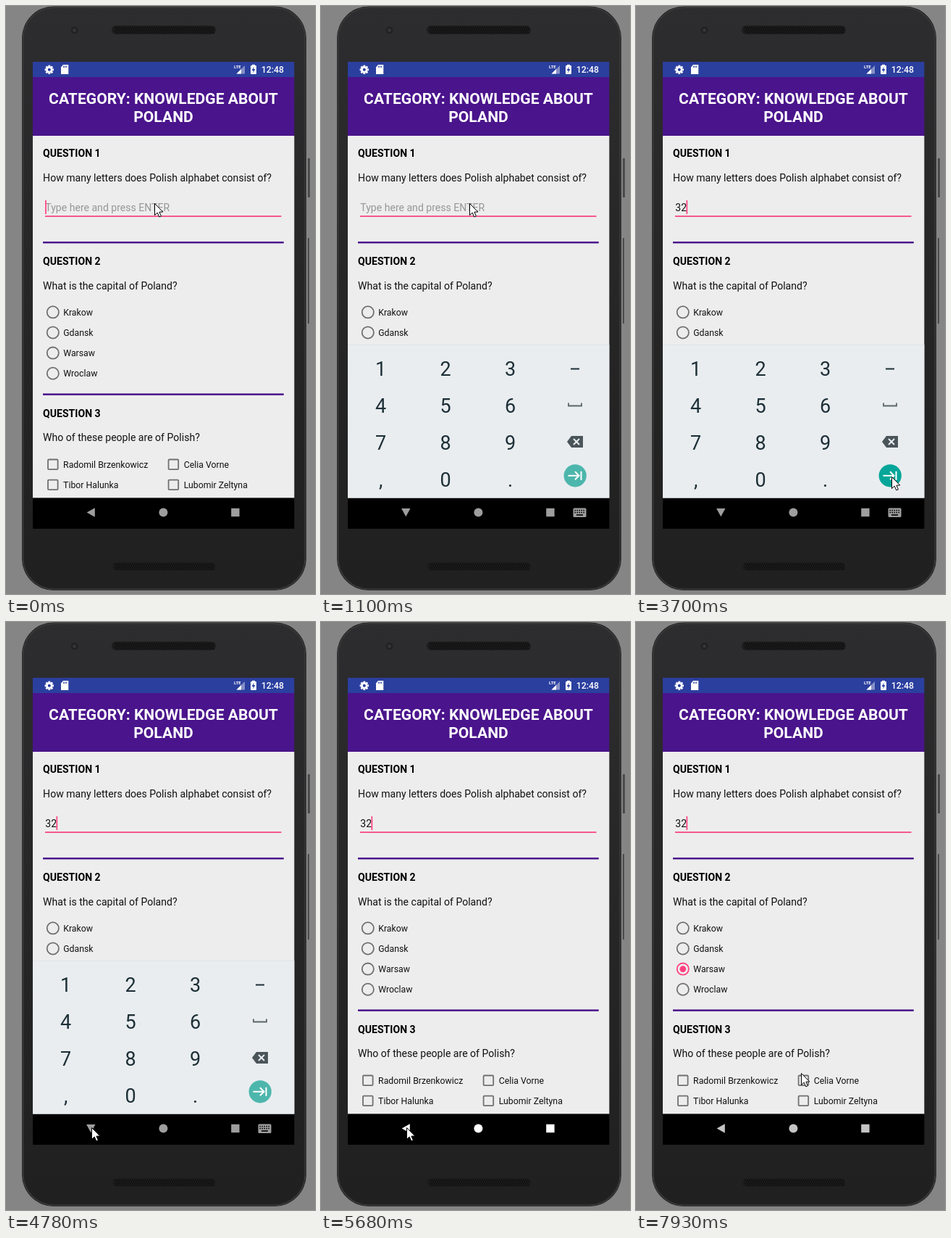
These frames come from a looping animation (427x811 px, 8 s). An HTML page with a canvas:

```html
<!DOCTYPE html>
<html lang="en">
<head>
<meta charset="utf-8">
<title>Quiz on a phone</title>
<style>
html, body { margin: 0; width: 100%; height: 100%; overflow: hidden; background: #858585; }
canvas { display: block; width: 427px; height: 811px; }
</style>
</head>
<body>
<canvas id="stage" width="427" height="811"></canvas>
<script>
const stage = document.getElementById('stage');
const main = stage.getContext('2d');
const layer = document.createElement('canvas');
layer.width = stage.width;
layer.height = stage.height;
const overlay = layer.getContext('2d');
let ctx = main;

const LOOP = 8000;
const PINK = '#ff4081', PURPLE = '#4a148c', BLUE = '#2b3f9f';
const INK = '#111', KEY = '#1d2f36', GREY = '#707070';
const LEFT = 37, TOP = 77, WIDTH = 361.6, BOTTOM = 721, NAV = 678.6;
const MIDDLE = LEFT + WIDTH / 2;
const SMALL = 12.3, BODY = 14.07, TITLE = 21.1;

// Moments of the story
const OPEN = 720, DIGITS = [1940, 2600], ENTER = 3560, BACK = 5030, CLOSE = 5285, PICK = 7080;

// Pointer glides: start, end, x, y
const GLIDES = [[1130, 1780, 260, 502], [1960, 2320, 175, 503], [2890, 3420, 353, 649],
  [3800, 4700, 118, 697], [5960, 6610, 89, 482], [6640, 6850, 63, 477], [7230, 7850, 228, 622]];

const ramp = (t, a, b) => Math.max(0, Math.min(1, (t - a) / (b - a)));
const ease = (t, a, b) => { const p = ramp(t, a, b); return p * p * (3 - 2 * p); };

function rect(x, y, w, h, fill) {
  ctx.fillStyle = fill;
  ctx.fillRect(x, y, w, h);
}

function paint(fill, stroke, width = 1) {
  if (fill) { ctx.fillStyle = fill; ctx.fill(); }
  if (stroke) { ctx.strokeStyle = stroke; ctx.lineWidth = width; ctx.stroke(); }
}

function round(x, y, w, h, r, ...style) {
  ctx.beginPath();
  ctx.roundRect(x, y, w, h, r);
  paint(...style);
}

function disc(x, y, r, ...style) {
  ctx.beginPath();
  ctx.arc(x, y, r, 0, 7);
  paint(...style);
}

function shape(points, fill, stroke, width) {
  ctx.beginPath();
  points.forEach(([x, y]) => ctx.lineTo(x, y));
  if (fill) ctx.closePath();
  paint(fill, stroke, width);
}

function text(s, x, y, size = BODY, color = INK, weight = 400, align = 'left') {
  ctx.font = `${weight} ${size}px Roboto, sans-serif`;
  ctx.textAlign = align;
  ctx.fillStyle = color;
  ctx.fillText(s, x, y);
}

function grille(y) {
  round(146, y, 144, 12, 6, '#1c1c1d');
  for (let j = 0; j < 4; j++)
    for (let x = 150 + (j % 2) * 1.5; x < 287; x += 3)
      rect(x, y + 2 + j * 2.4, 1.5, 1.3, '#080808');
}

function drawPhone() {
  rect(0, 0, 427, 811, '#858585');
  rect(417, 210, 3, 54, '#4b4b4b');
  rect(417, 320, 2, 118, '#4b4b4b');
  const body = ctx.createLinearGradient(0, 0, 0, 811);
  body.addColorStop(0, '#2d2d2f');
  body.addColorStop(0.35, '#282829');
  body.addColorStop(1, '#202020');
  round(22, 0.5, 393, 805.5, 44, '#1c1c1c');
  round(23.5, 2, 390, 802.5, 43, body, '#383838', 2);
  disc(94.5, 33.5, 5, '#222224');
  disc(94.5, 33.5, 2.2, '#36383c');
  grille(27);
  grille(767);
}

function drawStatus() {
  rect(LEFT, TOP, WIDTH, 21, BLUE);
  ctx.save();
  ctx.translate(59.8, 87.8);
  disc(0, 0, 3.4, null, '#fff', 2.6);
  for (let i = 0; i < 8; i++) {
    ctx.rotate(Math.PI / 4);
    rect(-1.4, -6.2, 2.8, 4, '#fff');
  }
  ctx.restore();
  shape([[79, 81], [86.3, 81], [86.3, 94], [76, 94], [76, 84.5]], '#fff');
  for (let i = 0; i < 3; i++) rect(79 + i * 2, 82.5, 1, 2.5, BLUE);
  shape([[330, 82], [330, 93.5], [318.5, 93.5]], '#8791c8');
  shape([[325, 87], [325, 93.5], [318.5, 93.5]], '#fff');
  text('LTE', 315, 86.3, 6, '#fff', 700);
  rect(340, 80.8, 4, 2, '#fff');
  round(338, 82, 8, 12, 1, '#fff');
  shape([[342.8, 83.5], [339.6, 89], [341.8, 89], [341.2, 92.5], [344.4, 87], [342.2, 87]], BLUE);
  text('12:48', 352.7, 92.3, SMALL, '#fff', 500);
}

function drawInput(t) {
  const count = DIGITS.filter(d => t >= d).length;
  if (count) text('32'.slice(0, count), 54.3, 283.4);
  else text('Type here and press ENTER', 54.3, 283.4, BODY, '#969696');
  rect(54, 289, 326.5, 2, '#f7588f');

  const since = t - (DIGITS[count - 1] ?? -400);
  if (since % 1000 < 500) rect(54.1 + count * 7.7, 268, 1.7, 19, PINK);
}

function drawRadio(y, label, picked) {
  disc(64.8, y, 8.1, null, picked ? PINK : GREY, 1.8);
  disc(64.8, y, 4.4 * picked, PINK);
  text(label, 79.2, y + 4.4, SMALL);
}

function drawCheck(x, y, label) {
  round(x - 6.8, y - 6.8, 13.6, 13.6, 1.2, null, GREY, 1.8);
  text(label, x + 14.3, y + 4.4, SMALL);
}

function drawQuestion(n, y, question) {
  text('QUESTION ' + n, 51.1, y, BODY, '#000', 700);
  text(question, 51.1, y + 33.2);
  if (n > 1) rect(51, y - 32.4, 332.8, 2.5, PURPLE);
}

function drawQuiz(t) {
  rect(LEFT, 98, WIDTH, 81, PURPLE);
  text('CATEGORY: KNOWLEDGE ABOUT', MIDDLE - 0.3, 134.9, TITLE, '#fff', 700, 'center');
  text('POLAND', MIDDLE - 0.3, 159.5, TITLE, '#fff', 700, 'center');
  rect(LEFT, 179, WIDTH, NAV - 179, '#ededed');

  drawQuestion(1, 208.3, 'How many letters does Polish alphabet consist of?');
  drawInput(t);

  drawQuestion(2, 357.3, 'What is the capital of Poland?');
  const picked = ease(t, PICK, PICK + 150);
  const glow = 0.15 * picked * (1 - ramp(t, PICK + 100, PICK + 500));
  disc(64.8, 478.6, 12.5, `rgba(255,64,129,${glow})`);
  ['Krakow', 'Gdansk', 'Warsaw', 'Wroclaw'].forEach((city, i) =>
    drawRadio(422.3 + 28.15 * i, city, city === 'Warsaw' ? picked : 0));

  drawQuestion(3, 566.8, 'Who of these people are of Polish?');
  ['Radomil Brzenkowicz', 'Celia Vorne', 'Tibor Halunka', 'Lubomir Zeltyna'].forEach((name, i) =>
    drawCheck(64.8 + 166.6 * (i % 2), 632.3 + 28.1 * (i >> 1), name));
}

function drawKeys(t) {
  rect(LEFT, 467, WIDTH, NAV - 467, '#e9edf0');
  rect(LEFT, 467, WIDTH, 1, '#dfe3e5');

  DIGITS.forEach((when, i) => {
    const fade = t < when - 100 ? 0 : 1 - ramp(t, when - 100, when + 400);
    rect(216.5 - 89.5 * i, 476, 90, 48, `rgba(238,238,236,${fade})`);
  });
  ['123', '456', '789', ',0.'].forEach((row, j) =>
    [...row].forEach((c, i) => text(c, 82.6 + i * 89.5, 510 + j * 51, 27, KEY, 400, 'center')));

  rect(345, 499.5, 12, 2, KEY);
  shape([[342, 547.5], [342, 551.5], [360, 551.5], [360, 547.5]], null, '#5b666b', 1.8);
  shape([[340, 601], [346, 593], [362, 593], [362, 609], [346, 609]], '#4a555a');
  shape([[349, 597], [357, 605]], null, '#e9edf0', 2);
  shape([[357, 597], [349, 605]], null, '#e9edf0', 2);

  disc(351.2, 647.8, 15.6, t > ENTER && t < ENTER + 240 ? '#05a699' : '#4db6ac');
  shape([[341.5, 647.8], [356, 647.8]], null, '#fff', 2);
  shape([[351, 642.3], [356.5, 647.8], [351, 653.3]], null, '#fff', 2);
  rect(358.5, 641.8, 2, 12, '#fff');
}

// Slides and fades the keyboard as one flat layer
function drawKeyboard(t) {
  const shown = ease(t, OPEN, OPEN + 360) * (1 - ramp(t, CLOSE, CLOSE + 145));
  if (!shown) return;
  overlay.clearRect(0, 0, layer.width, layer.height);
  ctx = overlay;
  drawKeys(t);
  ctx = main;
  ctx.globalAlpha = shown;
  ctx.drawImage(layer, 0, 50 * (1 - shown));
  ctx.globalAlpha = 1;
}

function drawNav(t) {
  const open = t > OPEN && t < CLOSE;
  const level = t < BACK ? 158 : 255 - 59 * ramp(t, 7150, 7930);
  const tone = `rgb(${level},${level},${level})`;
  const y = 698.5;

  const ripple = ramp(t, BACK, BACK + 170) * (1 - ramp(t, BACK + 450, BACK + 640));
  round(70, NAV, 95, BOTTOM - NAV, 21, `rgba(255,255,255,${0.18 * ripple})`);

  ctx.save();
  ctx.translate(117.3, y);
  if (open) ctx.rotate(-Math.PI / 2);
  shape([[5.5, -6.2], [5.5, 6.2], [-5.7, 0]], tone);
  ctx.restore();
  disc(217.4, y, 6, tone);
  rect(311.2, y - 5.7, 11.4, 11.4, tone);

  if (!open) return;
  round(348.5, y - 6, 18, 12.5, 1.5, tone);
  for (let i = 0; i < 10; i++)
    rect(350.4 + (i % 5) * 3, y - 3.7 + (i > 4 ? 3 : 0), 1.6, 1.6, '#000');
  rect(353, y + 2.7, 9, 1.6, '#000');
}

function drawPointer(t) {
  let x = 205, y = 272;
  for (const [from, to, nextX, nextY] of GLIDES) {
    const p = ease(t, from, to);
    x += (nextX - x) * p;
    y += (nextY - y) * p;
  }
  ctx.save();
  ctx.translate(x + 0.5, y + 0.5);
  shape([[0, 0], [0, 16], [3.7, 12.6], [6.3, 18.4], [8.9, 17.3], [6.4, 11.7], [11.3, 11.5]], '#fff', '#000');
  ctx.restore();
}

function draw(t) {
  drawPhone();
  ctx.save();
  ctx.beginPath();
  ctx.rect(LEFT, TOP, WIDTH, BOTTOM - TOP);
  ctx.clip();
  drawStatus();
  drawQuiz(t);
  rect(LEFT, NAV, WIDTH, BOTTOM - NAV, '#000');
  drawKeyboard(t);
  drawNav(t);
  ctx.restore();
  drawPointer(t);
}

const start = performance.now();
function tick() {
  draw((performance.now() - start) % LOOP);
  requestAnimationFrame(tick);
}
tick();
</script>
</body>
</html>
```
